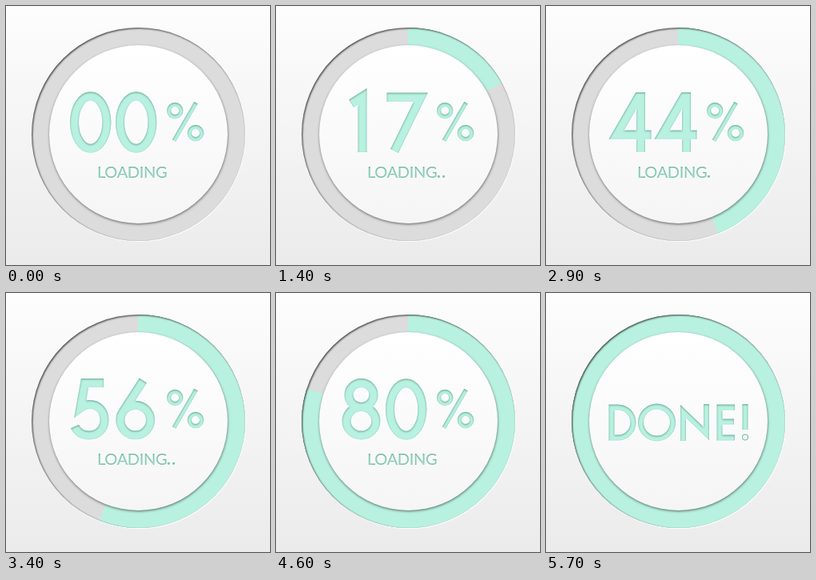
Write an HTML page that moves like this. It is 330 by 324 pixels and loops after 7.7 s.

```html
<!DOCTYPE html>
<html lang="en">
<head>
<meta charset="utf-8">
<title>Loading</title>
<style>
  html, body { margin: 0; width: 100%; height: 100%; overflow: hidden; }
  svg { display: block; width: 330px; height: 324px; }
  .ink { fill: none; stroke: #b8f1e0; stroke-miterlimit: 6; }
  text { font: 20px Lato, sans-serif; fill: #b0eedb; letter-spacing: -.3px; }
  #dots { font-weight: 700; letter-spacing: 1.4px; }
</style>
</head>
<body>
<svg viewBox="0 0 330 324" role="img">
  <defs>
    <linearGradient id="page" x2="0" y2="1">
      <stop stop-color="#fdfdfd"/><stop offset="1" stop-color="#ebebeb"/>
    </linearGradient>
    <linearGradient id="face" x2="0" y2="1">
      <stop stop-color="#fff"/><stop offset="1" stop-color="#f5f5f5"/>
    </linearGradient>
    <!-- Inner shadow from the top left, white lip at the bottom right -->
    <filter id="groove" filterUnits="userSpaceOnUse" x="0" y="0" width="330" height="324" color-interpolation-filters="sRGB">
      <feGaussianBlur in="SourceAlpha" stdDeviation="1.2"/>
      <feOffset dx=".5" dy=".9" result="moved"/>
      <feFlood flood-color="#000" flood-opacity=".75"/>
      <feComposite in2="moved" operator="out"/>
      <feComposite in2="SourceAlpha" operator="in" result="shade"/>
      <feDropShadow in="SourceGraphic" dx=".6" dy="1" stdDeviation=".4" flood-color="#fff" result="lip"/>
      <feMerge><feMergeNode in="lip"/><feMergeNode in="shade"/></feMerge>
    </filter>
    <filter id="press" filterUnits="userSpaceOnUse" x="0" y="0" width="330" height="324" color-interpolation-filters="sRGB">
      <feGaussianBlur in="SourceAlpha" stdDeviation=".9"/>
      <feOffset dx=".3" dy=".7" result="moved"/>
      <feFlood flood-color="#2c6e5a" flood-opacity=".6"/>
      <feComposite in2="moved" operator="out"/>
      <feComposite in2="SourceAlpha" operator="in" result="shade"/>
      <feDropShadow in="SourceGraphic" dx=".4" dy="1" stdDeviation=".3" flood-color="#fff" result="lip"/>
      <feMerge><feMergeNode in="lip"/><feMergeNode in="shade"/></feMerge>
    </filter>
    <filter id="raise" filterUnits="userSpaceOnUse" x="0" y="0" width="330" height="324" color-interpolation-filters="sRGB">
      <feDropShadow dx=".3" dy="1.2" stdDeviation="1.5" flood-color="#000" flood-opacity=".52"/>
    </filter>
  </defs>

  <rect width="330" height="324" fill="url(#page)"/>
  <g filter="url(#groove)">
    <circle cx="165.5" cy="160.5" r="133.5" fill="#dcdcdc"/>
    <circle id="arc" class="ink" cx="165.5" cy="160.5" r="122" stroke-width="23" pathLength="100" transform="rotate(-90.2 165.5 160.5)"/>
  </g>
  <circle cx="165.5" cy="160.5" r="111.5" fill="url(#face)" filter="url(#raise)"/>

  <g id="counter" filter="url(#press)">
    <path id="tens" class="ink" stroke-width="11" transform="translate(80 107)"/>
    <path id="units" class="ink" stroke-width="11" transform="translate(137 107)"/>
    <g class="ink" stroke-width="5.2">
      <circle cx="211.2" cy="131" r="7.6"/>
      <circle cx="237" cy="159" r="7.7"/>
      <path d="M237.5 121L210 168.5"/>
    </g>
    <text x="114" y="215">LOADING</text>
    <text x="201" y="215" id="dots"></text>
  </g>
  <path id="done" class="ink" stroke-width="7" filter="url(#press)"
    d="M82 143H90A19 19 0 0 1 90 181H82Z
       M118.5 162a20 20 0 0 1 40 0a20 20 0 0 1 -40 0Z
       M171.5 185V148L200.5 176V139
       M236 143H217V181H236M217 161H235
       M249 139V171M248.5 180.5a.5 .5 0 0 1 1 0a.5 .5 0 0 1 -1 0Z"/>
</svg>
<script>
const $ = id => document.getElementById(id);

const ellipse = (cx, cy, rx, ry) =>
  `M${cx - rx} ${cy}a${rx} ${ry} 0 0 1 ${2 * rx} 0a${rx} ${ry} 0 0 1 ${-2 * rx} 0Z`;

// Centre lines of the geometric numerals, in a 52 x 77 box
const numerals = [
  ellipse(25.7, 38.5, 20.2, 32.8),
  'M14 15L28 6V76',
  'M8 26C8 13 15 6 25 6S42 13 42 23C42 36 31 44 11 70.5H47',
  'M9.5 21C10 12 16 6 24 6S39 12.5 39 21S32 36 21 36.5C35 36.5 43 43 43 53.5S35 71 25 71S8 65 7.5 54',
  'M51.5 54H8L37 3.7M38.5 1V75.5',
  'M42 5.5H18.5L13 36.5C17 33.5 21 32.5 25 32.5C36 32.5 43 41 43 52S35 71 24 71C15 71 9 66.5 6 60',
  ellipse(24.7, 52, 18.8, 18.8) + 'M34.3 2.5L9.1 41.6',
  'M1.5 7H44L11 74.5',
  ellipse(26.5, 20.5, 15.5, 15) + ellipse(26.5, 53.3, 18.4, 17.8),
  ellipse(26.5, 25, 18.8, 18.8) + 'M16.9 74.5L42.1 35.4',
];

const LOOP = 7700, STEP = 100, LAST = 53;
// [step, percent]: the pace varies a little along the way
const pace = [[0, 0], [4, 6], [8, 13], [16, 30], [24, 43], [25, 44], [32, 61],
  [35, 67], [40, 77], [42, 80], [48, 91], [52, 99], [LAST, 100]];

function percentAt(step) {
  const i = Math.max(1, pace.findIndex(p => p[0] >= step));
  const [s0, p0] = pace[i - 1], [s1, p1] = pace[i];
  return Math.round(p0 + (p1 - p0) * (step - s0) / (s1 - s0));
}

function draw(now) {
  const time = now % LOOP;
  const step = Math.min(LAST, Math.max(0, Math.floor(time / STEP) - 4));
  const percent = percentAt(step), finished = step === LAST;

  $('arc').setAttribute('stroke-dasharray', finished ? 'none' : `${percent} 200`);
  $('counter').style.display = finished ? 'none' : '';
  $('done').style.display = finished ? '' : 'none';
  $('tens').setAttribute('d', numerals[Math.floor(percent / 10) % 10]);
  $('units').setAttribute('d', numerals[percent % 10]);
  $('dots').textContent = '.'.repeat(Math.floor(step / 5) % 4);
  document.querySelector('svg').setAttribute('aria-label', finished ? 'DONE!' : `${percent}% LOADING`);
}

const start = performance.now();
function tick() {
  draw(performance.now() - start);
  requestAnimationFrame(tick);
}
tick();
</script>
</body>
</html>
```
